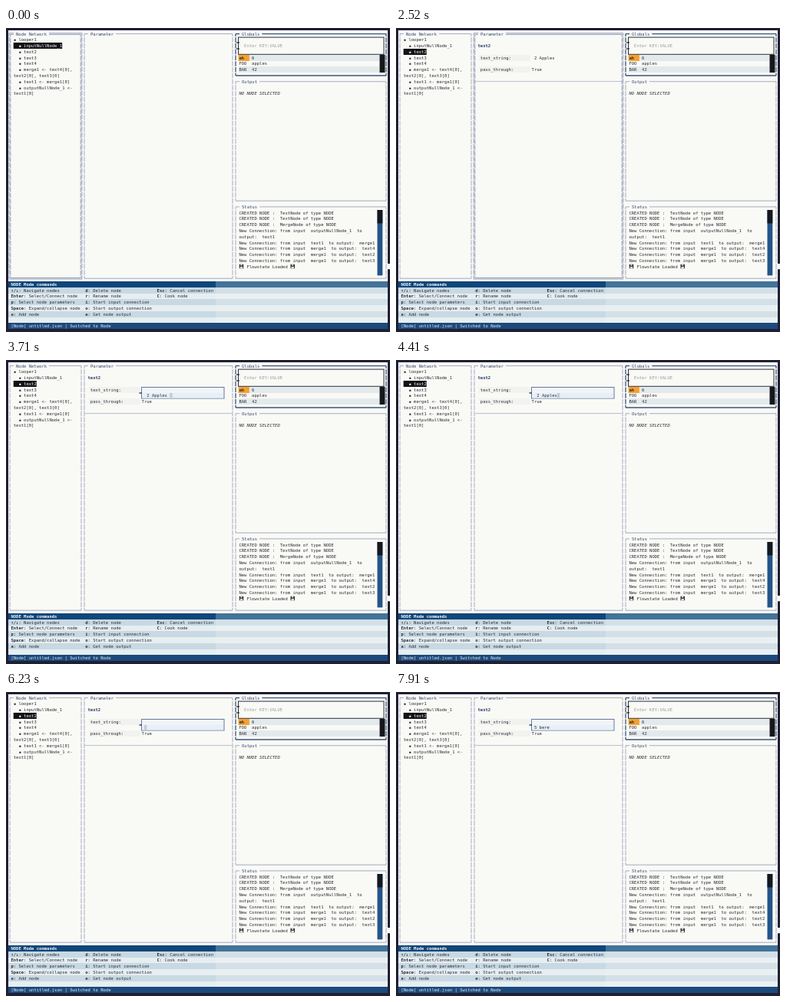
An HTML page with a canvas for the animation above (8000 ms loop, 500 by 396 pixels).

```html
<!DOCTYPE html>
<html lang="en">
<head>
<meta charset="utf-8">
<title>Node editor</title>
<style>
html, body { margin: 0; width: 100%; height: 100%; overflow: hidden; background: #201f33; }
canvas { display: block; }
</style>
</head>
<body>
<canvas id="stage" width="500" height="396"></canvas>
<script>
const ctx = document.getElementById('stage').getContext('2d');
const LOOP = 8000, CHAR = 3.337, LINE = 7.77;
const INK = '#2c2c34', PAPER = '#f9f9f6', TITLE = '#34466f';
const DIM = '#9ba1bb', FOCUS = '#7b87a8', DEEP = '#3a5578';

// The screen is a terminal grid: columns and rows to pixels.
const colX = c => 6.4 + CHAR * c;
const rowY = r => 7.6 + LINE * r;
const rowTop = r => Math.round(rowY(r) - LINE / 2);

function rect(x, y, w, h, color) {
  ctx.fillStyle = color;
  ctx.fillRect(x, y, w, h);
}

function band(x1, x2, row, color) {
  rect(x1, rowTop(row), x2 - x1, rowTop(row + 1) - rowTop(row), color);
}

// Drawn large and scaled down to keep fractional character widths.
function textAt(s, x, row, color = INK, style = '') {
  ctx.save();
  ctx.translate(x, rowY(row) + 2);
  ctx.scale(.1, .1);
  ctx.font = style + ' 55.43px "DejaVu Sans Mono", monospace';
  ctx.fillStyle = color;
  ctx.fillText(s, 0, 0);
  ctx.restore();
}

const text = (s, col, ...rest) => textAt(s, colX(col), ...rest);

function line(x1, y1, x2, y2, color, width, dash = []) {
  ctx.strokeStyle = color;
  ctx.lineWidth = width;
  ctx.setLineDash(dash);
  ctx.lineDashOffset = 3.2;
  ctx.beginPath();
  ctx.moveTo(x1, y1);
  ctx.lineTo(x2, y2);
  ctx.stroke();
}

function frame(x1, x2, y1, y2, gap, color, width) {
  line(x1, y1, gap[0], y1, color, width);
  line(gap[1], y1, x2, y1, color, width);
  line(x1, y2, x2, y2, color, width);
  for (const x of [x1, x2]) line(x, y1, x, y2, color, width, [6.6, LINE - 6.6]);
}

function panel(title, x1, x2, top, bottom, { focused = false, color = DIM, width = .9 } = {}) {
  const y1 = rowY(top), y2 = rowY(bottom), tx = x1 + 8;
  const gap = [x1 + 5, tx + title.length * CHAR + 3];
  if (focused) {
    for (const d of [-.8, .8]) frame(x1 - d, x2 + d, y1 - d, y2 + d, gap, FOCUS, .8);
  } else {
    frame(x1, x2, y1, y2, gap, color, width);
  }
  textAt(title, tx, top, TITLE);
}

function inputBox(x1, y1, x2, y2, fill, color) {
  rect(x1, y1, x2 - x1, y2 - y1, fill);
  ctx.strokeStyle = color;
  ctx.lineWidth = 1;
  ctx.setLineDash([]);
  ctx.strokeRect(x1, y1, x2 - x1, y2 - y1);
}

const tree = ['▪ looper1', '  ▪ inputNullNode_1', '  ▪ text2', '  ▪ text3', '  ▪ text4',
  '  ▪ merge1 <- text4[0],', 'text2[0], text3[0]', '  ▪ text1 <- merge1[0]',
  '  ▪ outputNullNode_1 <-', 'text1[0]'];

const log = ['CREATED NODE :  TextNode of type NODE', 'CREATED NODE :  TextNode of type NODE',
  'CREATED NODE :  MergeNode of type NODE', 'New Connection: from input  outputNullNode_1  to',
  'output:  text1', 'New Connection: from input  text1  to output:  merge1',
  'New Connection: from input  merge1  to output:  text4',
  'New Connection: from input  merge1  to output:  text2',
  'New Connection: from input  merge1  to output:  text3', '   Flowstate Loaded'];

const commands = [
  [['↑/↓', 'Navigate nodes'], ['d', 'Delete node'], ['Esc', 'Cancel connection']],
  [['Enter', 'Select/Connect node'], ['r', 'Rename node'], ['C', 'Cook node']],
  [['p', 'Select node parameters'], ['i', 'Start input connection']],
  [['Space', 'Expand/collapse node'], ['o', 'Start output connection']],
  [['a', 'Add node'], ['e', 'Get node output']]];

const MOVE = 350, SELECT = 1400, FOCUS_PANEL = 2520, FOCUS_INPUT = 3080, DESELECT = 3710, BLINK = 7910;
const erase = [4410, 4970, 5040, 5110, 5180, 5250, 5320, 5390, 5460, 6230];
const type = [6510, 6860, 7070, 7140, 7280, 7350];

function editedText(t) {
  const passed = times => times.filter(at => t >= at).length;
  return t < type[0] ? ' 2 Apples '.slice(0, 10 - passed(erase)) : '5 bere'.slice(0, passed(type));
}

function drawTree(t) {
  panel('Node Network', 5, 98, 0, 41, { focused: t < FOCUS_PANEL });
  const selected = t < MOVE ? 1 : 2;
  tree.forEach((s, i) => {
    const on = i === selected;
    if (on) band(colX(1), colX(1 + s.length), i + 1, '#111116');
    text(s, 1, i + 1, on ? '#f4f4f4' : INK);
  });
}

function drawFloppy(x, y) {
  rect(x, y, 5.4, 5.4, '#25252b');
  rect(x + 1.4, y, 2.4, 1.8, '#d8d8d8');
  rect(x + 1, y + 3, 3.4, 2.4, '#e8e8e8');
}

function drawEditor(t) {
  const s = editedText(t), width = s.length * CHAR, x = colX(52);
  inputBox(176.5, 35.5, 284, 50, '#f1f5f8', '#64799f');
  rect(178, 42.6, 105, 7, '#e7eff7');
  line(173.5, 43, 177, 43, '#333a50', 1.4);
  if (t < DESELECT) rect(x, 43, width, 6.6, '#c3d2e2');
  else if (t < BLINK) rect(x + width, 43, CHAR, 6.6, '#c3ccd4');
  text(s, 52, 5);
}

function drawParameters(t) {
  panel('Parameter', 102, 295, 0, 41, { focused: t >= FOCUS_PANEL && t < FOCUS_INPUT });
  if (t < SELECT) return;
  text('text2', 30, 2, '#223a66', 'bold');
  for (const row of [4, 6]) band(108, 175, row, '#f2f3f0');
  text('text_string:', 31, 4);
  text('pass_through:', 31, 6);
  text('True', 51, 6);
  line(103, 69.6, 294, 69.6, '#a6afc4', .8);
  if (t < FOCUS_INPUT) text(' 2 Apples', 51, 4);
  else drawEditor(t);
}

function drawGlobals() {
  panel('Globals', 299, 495, 0, 7, { color: DEEP, width: 1.3 });
  inputBox(302.5, 12.1, 492, 34.3, PAPER, '#2b303c');
  for (const y of [19, 27]) line(300, y, 304, y, '#222', 1.2);
  text('Enter KEY:VALUE', 91, 2, '#9a9a9a');
  for (const row of [4, 6]) band(303, 486.5, row, '#e3eaec');
  band(302.6, 316.8, 4, '#f6a02c');
  [['ah', '6'], ['FOO', 'apples'], ['BAR', '42']].forEach(([key, value], i) => {
    text(key, 89, i + 4, INK, i ? '' : 'bold');
    text(value, 94, i + 4);
  });
  rect(486.5, 34.8, 7, 23.3, '#16181d');
}

function drawStatus() {
  panel('Output', 299, 495, 8, 28);
  text('NO NODE SELECTED', 89, 10, INK, 'italic');
  panel('Status', 299, 495, 29, 41);
  log.forEach((s, i) => text(s, 89, i + 30));
  for (const col of [89, 109]) drawFloppy(colX(col) + .4, 307.8);
  rect(483.5, 237, 6.8, 85.4, '#24548a');
  rect(483.5, 237, 6.8, 17.5, '#14181e');
}

function drawCommands() {
  band(3, 273, 42, '#10467a');
  band(273, 497, 42, '#437399');
  for (let i = 0; i < 6; i++) {
    const odd = i % 2;
    band(3, 273, 43 + i, odd ? '#e6eef1' : '#c8d9e3');
    band(273, 497, 43 + i, odd ? '#eaf0f2' : '#d3e0e7');
  }
  band(3, 497, 49, '#1c4a7d');
  text('NODE Mode commands', 0, 42, '#f0f5f8', 'bold');
  commands.forEach((items, i) => items.forEach(([key, label], n) => {
    const col = [0, 29, 57][n];
    text(key, col, 43 + i, INK, 'bold');
    text(': ' + label, col + key.length, 43 + i);
  }));
  text('[Node] untitled.json | Switched to Node', 0, 49, '#e4edf5');
}

function draw(now) {
  const t = now % LOOP;
  rect(0, 0, 500, 396, '#201f33');
  rect(3, 3, 494, 389, PAPER);
  rect(497, 307, 3, 7.2, '#fafafa');
  drawTree(t);
  drawParameters(t);
  drawGlobals();
  drawStatus();
  drawCommands();
  requestAnimationFrame(draw);
}
requestAnimationFrame(draw);
</script>
</body>
</html>
```
